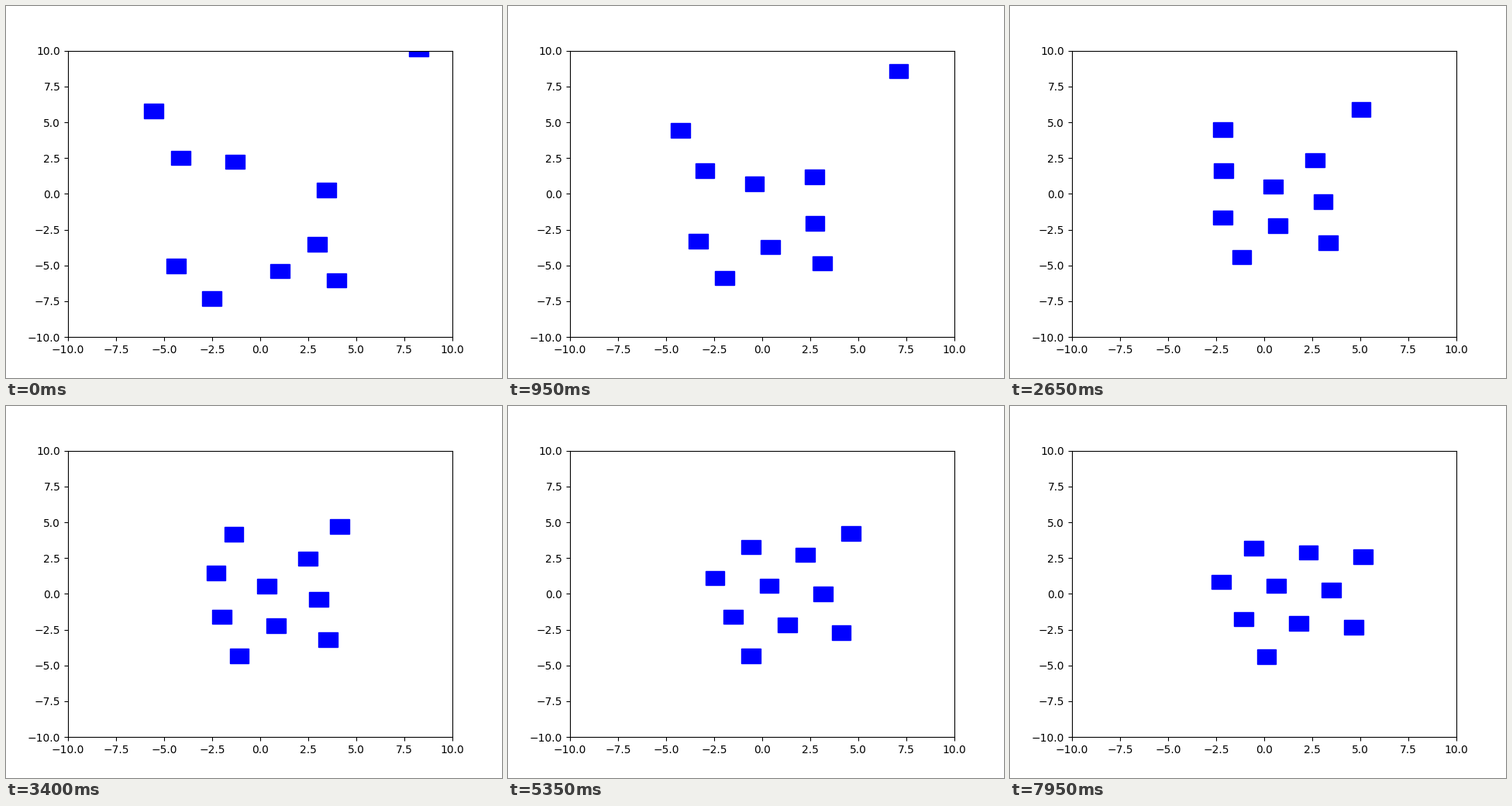
These frames come from a looping animation (640x480 px, 8 s). A matplotlib script:

```python
import numpy as np
import matplotlib.pyplot as plt
from matplotlib.animation import FuncAnimation
from matplotlib.patches import Rectangle

FRAMES = 160
INTERVAL = 50
GAP = 2.87             # spacing of the settled lattice
MEET, LOCK = 29, 85    # frames when the blocks meet and when the lattice is set

# Points are complex numbers in data units: start, first contact, lattice slot.
BLOCKS = [
    (8.25 + 10.09j, 4.13 + 4.70j, (2, -1)),
    (-5.54 + 5.78j, -3.57 + 3.73j, (0, -1)),
    (-4.12 + 2.51j, -2.38 + 1.13j, (-1, 0)),
    (-1.31 + 2.24j, 0.08 - 0.11j, (0, 0)),
    (3.45 + 0.27j, 2.32 + 1.65j, (1, -1)),
    (2.97 - 3.52j, 2.62 - 1.30j, (1, 0)),
    (-4.37 - 5.04j, -2.78 - 2.39j, (-1, 1)),
    (1.03 - 5.39j, 0.12 - 2.85j, (0, 1)),
    (3.98 - 6.04j, 2.66 - 4.23j, (1, 1)),
    (-2.52 - 7.31j, -1.65 - 5.12j, (-1, 2)),
]
# Blocks that roll around a neighbour: hub, frame of contact, frame of arrival.
ROLLS = {0: (4, 68, FRAMES - 1), 1: (2, MEET, LOCK)}


def ease(n, begin, end):
    return np.clip((n - begin) / (end - begin), 0, 1) ** 1.3


def centre(n):
    return np.interp(n, [MEET, 41, LOCK, FRAMES - 1],
                     [0.08 - 0.11j, 0.53 + 0.51j, 0.25 + 0.55j, 0.62 + 0.56j])


def lattice(n, slot):
    """Offset of a slot from the centre of the slowly turning hexagonal lattice."""
    turn = np.radians(-13.2 + 0.101 * (n - LOCK))
    i, j = slot
    return GAP * (i + j * np.exp(-1j * np.pi / 3)) * np.exp(1j * turn)


def place(n, k):
    """Centre of block k at frame n."""
    start, touch, slot = BLOCKS[k]
    hub, meet, lock = ROLLS.get(k, (None, MEET, LOCK))
    if n < meet:
        return start + (touch - start) * n / meet
    w = ease(n, meet, lock)
    if hub is None:
        offset = touch - centre(MEET)
        return centre(n) + offset + (lattice(n, slot) - offset) * w
    first = touch - place(meet, hub)
    last = lattice(n, slot) - lattice(n, BLOCKS[hub][2])
    radius = abs(first) + (abs(last) - abs(first)) * w
    angle = np.angle(first) + (np.angle(last) - np.angle(first)) * w
    return place(n, hub) + radius * np.exp(1j * angle)


fig, ax = plt.subplots(figsize=(6.4, 4.8), dpi=100)
ax.set_xlim(-10, 10)
ax.set_ylim(-10, 10)
blocks = [ax.add_patch(Rectangle((0, 0), 1, 1, color="blue")) for _ in BLOCKS]


def update(n):
    for k, block in enumerate(blocks):
        p = place(n, k)
        block.set_xy((p.real - 0.5, p.imag - 0.5))
    return blocks


anim = FuncAnimation(fig, update, frames=FRAMES, interval=INTERVAL,
                     repeat=True, repeat_delay=0)
plt.show()
```
